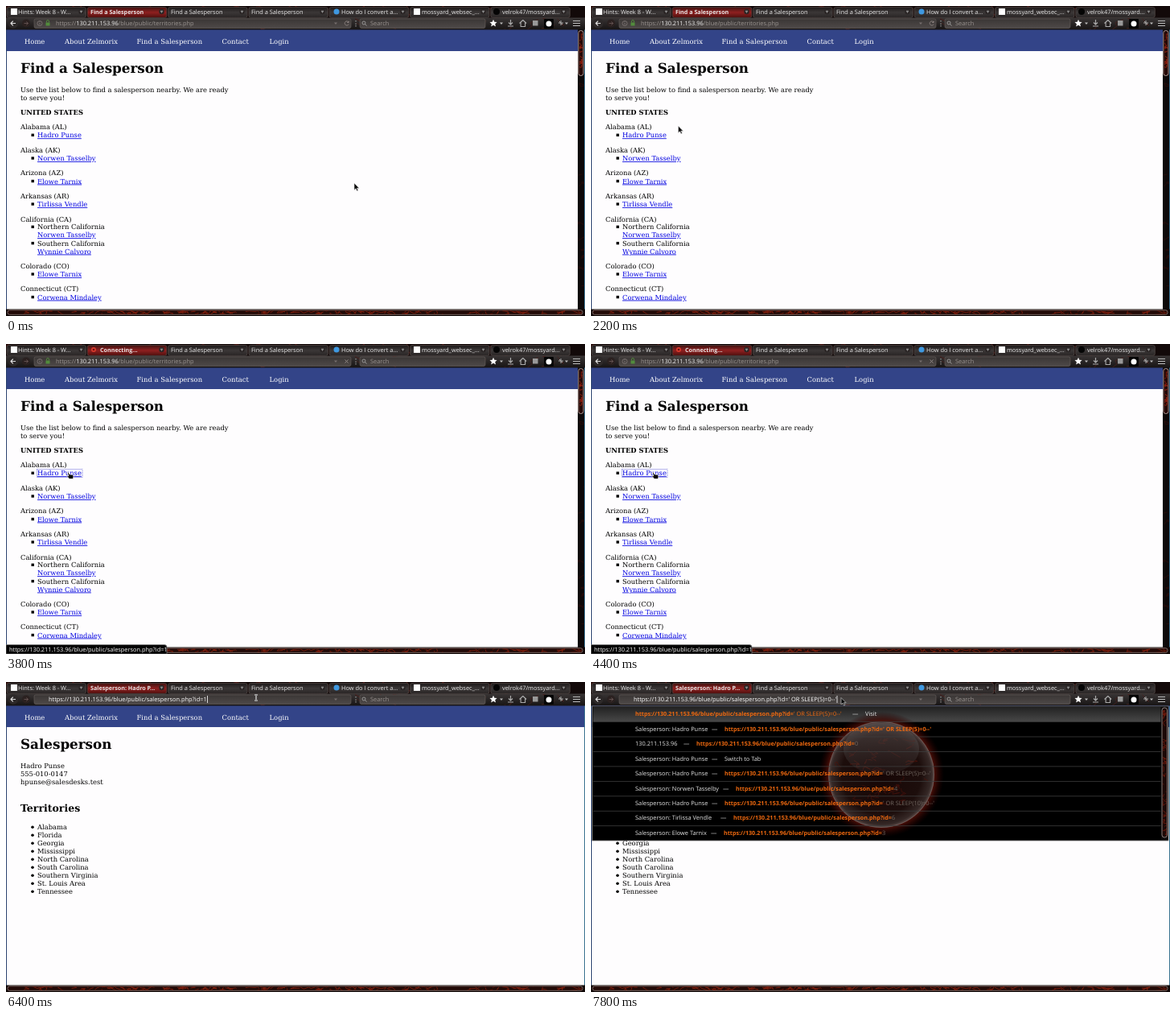
Recreate the animation shown at these times as an HTML page. Size 720 by 385 pixels, loop 8000 ms.

```html
<!DOCTYPE html>
<html lang="en">
<head>
<meta charset="utf-8">
<title>Browser session</title>
<style>
  html, body { margin: 0; width: 100%; height: 100%; overflow: hidden; background: #000; }
  svg { display: block; }
  text { white-space: pre; text-rendering: geometricPrecision; }
  .ui { font: 7.4px "Open Sans", "Noto Sans", sans-serif; fill: #e4e4e4; }
  .strong { font-size: 7.17px; font-weight: 700; }
  .serif { font: 8.36px "DejaVu Serif", serif; fill: #000; }
  .nav { font-size: 8.42px; fill: #fff; }
  .bold { font-weight: 700; }
  .h1 { font-size: 16.75px; font-weight: 700; }
  .h2 { font-size: 12.5px; font-weight: 700; }
  .link { fill: #0000e0; text-decoration: underline; }
  .dim { fill: #98928f; }
  .hot { fill: #f0690f; }
  .tail { fill: #70665f; font-weight: 400; font-size: 7.4px; }
</style>
</head>
<body>
<svg id="stage" width="100%" height="100%" viewBox="0 0 720 385"></svg>
<script>
const LOOP = 8000, STEP = 200;
const HOST = '130.211.153.96', SCHEME = 'https://';
const SALES = '/blue/public/salesperson.php?id=';
const QUERY = SCHEME + HOST + SALES;
const INJECT = "' OR SLEEP(5)=0--'";
const [punse, tasselby, tarnix, vendle, calvoro, mindaley] =
  ['Hadro Punse', 'Norwen Tasselby', 'Elowe Tarnix', 'Tirlissa Vendle', 'Wynnie Calvoro', 'Corwena Mindaley'];

let seed = 11;
const rand = () => (seed = (seed * 16807) % 2147483647) / 2147483647;
const text = (x, y, s, cls = 'ui') => `<text x="${x}" y="${y}" class="${cls}">${s}</text>`;
const span = (s, cls) => `<tspan class="${cls}">${s}</tspan>`;
const rect = (x, y, w, h, fill, more = '') =>
  `<rect x="${x}" y="${y}" width="${w}" height="${h}" fill="${fill}" ${more}/>`;
const dot = (x, y, r, fill) => `<circle cx="${x}" cy="${y}" r="${r}" fill="${fill}"/>`;
const path = (d, stroke, width = 1, fill = 'none') =>
  `<path d="${d}" fill="${fill}" stroke="${stroke}" stroke-width="${width}" stroke-linejoin="round"/>`;
const group = (id, body) => `<g id="${id}">${body}</g>`;
const gradient = (id, ...stops) => `<linearGradient id="${id}" x2="0" y2="1">${stops.map((c, i) =>
  `<stop offset="${i / (stops.length - 1)}" stop-color="${c}"/>`).join('')}</linearGradient>`;

// Jagged red cracks clipped to a box
function lava(x, y, w, h, count, color = '#8e1c0c') {
  let d = '';
  for (let i = 0; i < count; i++) {
    let px = rand() * w, py = rand() * h;
    d += `M${px} ${py}`;
    for (let k = 0; k < 4; k++) {
      px += (rand() - .5) * 16;
      py += (rand() - .5) * 9;
      d += `L${px.toFixed(1)} ${py.toFixed(1)}`;
    }
  }
  return `<svg x="${x}" y="${y}" width="${w}" height="${h}">${path(d, color, .8)}</svg>`;
}

function defs() {
  return `<defs>
    ${gradient('tab', '#1f1b1b', '#3b3737', '#292525')}
    ${gradient('tabOn', '#3f1412', '#8f2020', '#4e100e')}
    ${gradient('bar', '#393535', '#171414')}
    ${gradient('field', '#3a3635', '#4e4948')}
    ${gradient('pick', '#222', '#474747')}
    <radialGradient id="glow"><stop offset=".8" stop-color="#6e160c"/>
      <stop offset=".88" stop-color="#3c0a05" stop-opacity=".8"/>
      <stop offset="1" stop-color="#200" stop-opacity="0"/></radialGradient>
    <radialGradient id="ball"><stop offset="0" stop-color="#160605"/>
      <stop offset=".75" stop-color="#1d0e0c"/><stop offset=".94" stop-color="#352826"/>
      <stop offset="1" stop-color="#5c4a47"/></radialGradient>
    ${gradient('shine', '#66606088', '#44404033')}
  </defs>`;
}

function tabs() {
  const titles = [[15, 'Hints: Week 8 - W...'], null, [205, 'Find a Salesperson'], [305, 'Find a Salesperson'],
    [417, 'How do I convert a...'], [517, 'mossyard_websec_...'], [617, 'velrok47/mossyard...']];
  let out = rect(0, 0, 720, 15, '#120909') + lava(0, 0, 720, 15, 55, '#5a1812');
  titles.forEach((title, i) => {
    const x = 1 + i * 100.3, on = i === 1;
    out += rect(x, 1.5, 98.5, 13, on ? 'url(#tabOn)' : 'url(#tab)', 'rx="2.5" stroke="#5e5250" stroke-width=".6"');
    out += dot(93.5 + i * 100, 7, 3.2, '#292424') +
      path(`M${92 + i * 100} 6h3l-1.5 2.6z`, '#999', .5, '#888');
    if (title) out += text(title[0], 10, title[1]);
  });
  return out + rect(6, 3, 8, 8, '#fff') + dot(411, 7, 3.5, '#3f98e0') +
    rect(507, 3, 8, 8, '#fff') + dot(610, 7, 4, '#050505') +
    group('tabList', text(105, 10, 'Find a Salesperson', 'ui strong')) +
    group('tabWait', dot(109, 7, 3, '#d83a2c') + dot(109, 7, 1.3, '#611') + text(117, 10, 'Connecting...', 'ui strong')) +
    group('tabSales', text(105, 10, `Salesperson: ${punse.slice(0, 7)}...`, 'ui strong'));
}

function toolbar() {
  const idle = (id, rest) => `<text id="${id}" x="62" y="24" class="ui dim">${SCHEME}<tspan fill="#f4f4f4">${HOST}</tspan>${rest}</text>`;
  const icons = path('M606 16.8l1.4 3 3.2.3-2.4 2.2.8 3.2-3-1.7-2.8 1.7.7-3.2-2.4-2.2 3.2-.3z', 'none', 0, '#fff') +
    path('M614 20.5h4l-2 2.5z', 'none', 0, '#bbb') +
    path('M627.5 17v6m-2.5-2.5l2.5 2.5 2.5-2.5m-6 4.500h7', '#aaa', 1.2) +
    path('M638.5 21.5l4.300-4 4.300 4m-7-1v5h5.500v-5', '#aaa', 1.1) +
    rect(655, 18, 6.5, 6.5, '#999') + rect(669, 16, 12, 12, '#050505', 'rx="1"') + dot(675, 22, 3.5, '#fff') +
    path('M687 21h6m-3-3v6m-2-5l4 4', '#aaa', 1) + path('M695 20.5h4l-2 2.5z', 'none', 0, '#bbb') +
    path('M705 18.5h9m-9 3h9m-9 3h9', '#bbb', 1.1);
  return rect(0, 14.5, 720, 15, 'url(#bar)') + lava(0, 15, 720, 14, 18, '#48231f') +
    dot(9, 21.5, 6.2, '#2d2929') + path('M12 21.5H6m2.800-2.800L6 21.5l2.800 2.800', '#ddd', 1.2) +
    dot(25, 21.5, 5, '#2b2120') + path('M22.5 21.5h5m-2.200-2l2.200 2-2.200 2', '#685554', .9) +
    rect(35, 16, 394, 11.5, 'url(#field)', 'rx="2" stroke="#716866" stroke-width=".5"') +
    path('M408 20.5h4l-2 2.5z', 'none', 0, '#77706e') +
    group('reload', path('M426 20a2.600 2.600 0 1 0 .2 2.500m0-4v2h-2', '#8f8684', .9)) +
    group('stop', path('M421.5 19.5l4 4m0-4l-4 4', '#8f8684', 1)) +
    path('M435 18v1.500m0 2v1.500m0 1v1.500', '#aaa', 1) +
    rect(440, 16, 156, 11.5, 'url(#field)', 'rx="2" stroke="#716866" stroke-width=".5"') +
    '<circle cx="445" cy="21" r="2" fill="none" stroke="#aaa" stroke-width=".8"/>' + path('M446.5 22.5l2 2', '#aaa', .9) +
    text(453, 24, 'Search', 'ui dim') + icons +
    group('idle', '<circle cx="42" cy="21.5" r="3" fill="none" stroke="#8a8280" stroke-width=".7"/>' +
      path('M42 20.8v2.300m0-4v.8', '#8a8280', .8) +
      rect(49.5, 20.5, 5, 4, '#528c3c') + path('M50.5 20.5v-1.500a1.500 1.500 0 0 1 3 0v1.500', '#528c3c', .9) +
      idle('urlList', '/blue/public/territories.php') + idle('urlSales', SALES + 1)) +
    group('editing', '<text id="input" x="53" y="24" class="ui" style="fill:#fff"></text>' +
      rect(0, 17, .8, 9, '#fff', 'id="caret"'));
}

const pageFrame = width => rect(1, 29, width, 348, '#fefdfe') + rect(1, 29, width, 27, '#334488') +
  [[23, 'Home'], [73, 'About Zelmorix'], [162.5, 'Find a Salesperson'], [268.5, 'Contact'], [327.5, 'Login']]
    .map(([x, s]) => text(x, 46.5, s, 'serif nav')).join('');

function listPage() {
  const states = [[150, 'Alabama (AL)', punse], [178.7, 'Alaska (AK)', tasselby], [207.2, 'Arizona (AZ)', tarnix],
    [235.7, 'Arkansas (AR)', vendle], [322.7, 'Colorado (CO)', tarnix], [351.2, 'Connecticut (CT)', mindaley]];
  const square = y => rect(31.5, y - 1.4, 3.4, 3.4, '#000');
  const link = (y, name) => text(39, y + 3, name, 'serif link');
  let out = pageFrame(710) + text(18, 83, 'Find a Salesperson', 'serif h1') +
    text(18, 106.5, 'Use the list below to find a salesperson nearby. We are ready', 'serif') +
    text(18, 116.5, 'to serve you!', 'serif') + text(18, 135, 'UNITED STATES', 'serif bold');
  for (const [y, state, name] of states)
    out += text(18, y + 3.2, state, 'serif') + square(y + 10) + link(y + 10.3, name);
  out += text(18, 267.5, 'California (CA)', 'serif');
  [[274, 'Northern', tasselby], [294.3, 'Southern', calvoro]].forEach(([y, part, name]) =>
    out += square(y) + text(39, y + 3.2, part + ' California', 'serif') + link(y + 10.2, name));
  return out + rect(711, 29, 8, 348, '#0d0909') + lava(711, 88, 8, 288, 12, '#2c0c09') +
    rect(711.8, 30.5, 6.2, 56, '#240806', 'rx="3" stroke="#c9b5b0" stroke-width=".8"') + lava(713, 33, 4, 50, 16, '#8f2010');
}

function salesPage() {
  const places = ['Alabama', 'Florida', 'Georgia', 'Mississippi', 'North Carolina', 'South Carolina',
    'Southern Virginia', 'St. Louis Area', 'Tennessee'];
  return pageFrame(718) + text(18, 83, 'Salesperson', 'serif h1') +
    [punse, '555-010-0147', 'hpunse@salesdesks.test'].map((s, i) => text(18, 106.5 + i * 10, s, 'serif')).join('') +
    text(18, 161, 'Territories', 'serif h2') +
    places.map((s, i) => dot(33, 180.3 + i * 10, 1.8, '#000') + text(39, 183 + i * 10, s, 'serif')).join('');
}

function globe() {
  return '<svg x="2" y="30" width="706" height="166" viewBox="2 30 706 166">' +
    dot(361, 115, 78, 'url(#glow)') + dot(361, 115, 66, 'url(#ball)') +
    lava(315, 70, 92, 92, 26, '#43110b') + lava(303, 96, 116, 44, 14, '#4d130b') +
    '<ellipse cx="361" cy="83" rx="47" ry="32" fill="url(#shine)"/>' +
    '<circle cx="361" cy="115" r="65.5" fill="none" stroke="#a78e8a" stroke-opacity=".25"/></svg>';
}

function dropdown() {
  const baseline = i => 42.3 + i * 18.45;
  const row = (i, title, x, tail, tailClass = 'tail') => text(55, baseline(i), title) + text(x - 16, baseline(i), '—') +
    text(x, baseline(i), span(QUERY, 'hot strong') + span(tail, tailClass));
  const person = name => 'Salesperson: ' + name;
  const first = (tail, x) => text(55, baseline(0), span(QUERY, 'hot strong') + span(tail, 'hot')) +
    text(x - 16, baseline(0), '—') + text(x, baseline(0), 'Visit', 'ui');
  let lines = '';
  for (let i = 1; i < 9; i++) lines += rect(2.5, 30.7 + i * 18.45, 706, .8, '#3c3c3c');
  return rect(1.5, 30, 716.5, 167, '#000', 'stroke="#777" stroke-width=".8"') +
    rect(2.5, 31, 706, 18, 'url(#pick)') + globe() + lines +
    rect(709, 31, 8.5, 165, '#0d0909') +
    rect(710, 32, 6.5, 161, '#1c0907', 'rx="3" stroke="#a59a96" stroke-width=".8"') + lava(711, 35, 4.5, 155, 36, '#6f1b0d') +
    group('before', first('', 276) + row(1, HOST, 131, '')) +
    group('after', first(INJECT, 341) + row(1, person(punse), 166, INJECT, 'hot strong')) +
    row(2, HOST, 131, '0') +
    text(55, baseline(3), person(punse)) + text(150, baseline(3), '—') + text(166, baseline(3), 'Switch to Tab') +
    row(4, person(punse), 166, INJECT) + row(5, person(tasselby), 180, '4') +
    row(6, person(punse), 166, "' OR SLEEP(10)=0--'") + row(7, person(vendle), 177, '6') + row(8, person(tarnix), 165, '3');
}

const windowEdge = () => rect(0, 29, 1, 356, '#2d4470') + rect(719, 29, 1, 356, '#3a7391') +
  rect(0, 376.5, 720, 8.5, '#100807') +
  rect(2, 377.7, 715, 5.6, '#220a07', 'rx="2.5" stroke="#a18f8a" stroke-width=".7"') + lava(3, 378.5, 713, 4.2, 110, '#86200f');

const pointers = () => group('pointer',
  group('arrow', path('M0 0v8.500l2-1.800 1.500 3 1.400-.7-1.500-2.800h2.700z', '#ddd', .6, '#080808')) +
  group('beam', path('M-1.800-3.500h3.600M0-3.500v7M-1.800 3.500h3.600', '#fff', 1.5) +
    path('M-1.800-3.500h3.600M0-3.500v7M-1.800 3.500h3.600', '#444', .7)) +
  group('hand', path('M-1.500 0l1.200-.5 1.500 2.500 3.600.4 1.200 1.500-.6 3.600H.8L-2 4.300l.5-.9 1.500.6z', '#fff', .6, '#080808')));

const stage = document.getElementById('stage');
stage.innerHTML = defs() + tabs() + group('list', listPage()) + group('sales', salesPage()) + windowEdge() + toolbar() +
  group('focus', '<rect x="38.5" y="155.5" width="56.5" height="10" fill="none" stroke="#33c" stroke-width=".7" stroke-dasharray="1 1"/>') +
  group('status', path('M0 373.5H197q3 0 3 3V385H0z', '#777', .8, '#030303') +
    `<text x="4" y="381.5" class="ui" style="fill:#fff">${QUERY}1</text>`) +
  group('menu', dropdown()) + pointers();

const $ = id => document.getElementById(id);
const show = (id, on) => $(id).style.display = on ? '' : 'none';

const CLICK = 3800, LOADED = 4600, EDIT = 5800, MENU = 6600, PASTE = 7600;
const easeIn = u => u * u, easeOut = u => u * (2 - u), easeBoth = u => u * u * (3 - 2 * u);

// The pointer sweeps past the paragraph to the link, then up to the address bar
const track = [
  { at: 400, x: 433, y: 220, ease: easeIn },
  { at: 1400, x: 244, y: 100, ease: easeOut },
  { at: 2800, x: 78, y: 160, ease: () => 0 },
  { at: LOADED, x: 78, y: 160, ease: easeBoth },
  { at: 5400, x: 311, y: 19.5, ease: () => 0 }
];

function position(t) {
  const i = Math.max(0, track.findLastIndex(key => key.at <= t));
  const from = track[i], to = track[i + 1] || from;
  const e = to === from ? 0 : from.ease(Math.max(0, t - from.at) / (to.at - from.at));
  return [from.x + (to.x - from.x) * e, from.y + (to.y - from.y) * e];
}

function pointerKind(t, x, y) {
  if (t >= MENU) return 'arrow';
  const loaded = t >= LOADED;
  if (!loaded && x < 95 && y > 155 && y < 166) return 'hand';
  const overText = y < 29 || (loaded ? x < 93 && y > 150 : x < 276 && y > 98 && y < 118);
  return overText ? 'beam' : 'arrow';
}

function render(t) {
  const [x, y] = position(t), kind = pointerKind(t, x, y);
  const loaded = t >= LOADED, waiting = t >= CLICK && !loaded, edit = t >= EDIT, pasted = t >= PASTE;
  const visible = {
    list: !loaded, sales: loaded, tabList: t < CLICK, tabWait: waiting, tabSales: loaded,
    urlList: !loaded, urlSales: loaded, idle: !edit, editing: edit, reload: !waiting && !edit, stop: waiting,
    focus: waiting, status: kind === 'hand', menu: t >= MENU, before: !pasted, after: pasted,
    arrow: kind === 'arrow', beam: kind === 'beam', hand: kind === 'hand'
  };
  for (const id in visible) show(id, visible[id]);
  if (edit) {
    $('input').textContent = QUERY + (pasted ? INJECT : t < MENU ? '1' : '');
    $('caret').setAttribute('x', 53.4 + $('input').getComputedTextLength());
  }
  $('pointer').setAttribute('transform', `translate(${x.toFixed(1)} ${y.toFixed(1)})`);
}

let last = -1;
function tick() {
  const step = Math.floor(performance.now() % LOOP / STEP);
  if (step !== last) render((last = step) * STEP);
  requestAnimationFrame(tick);
}
tick();
</script>
</body>
</html>
```
